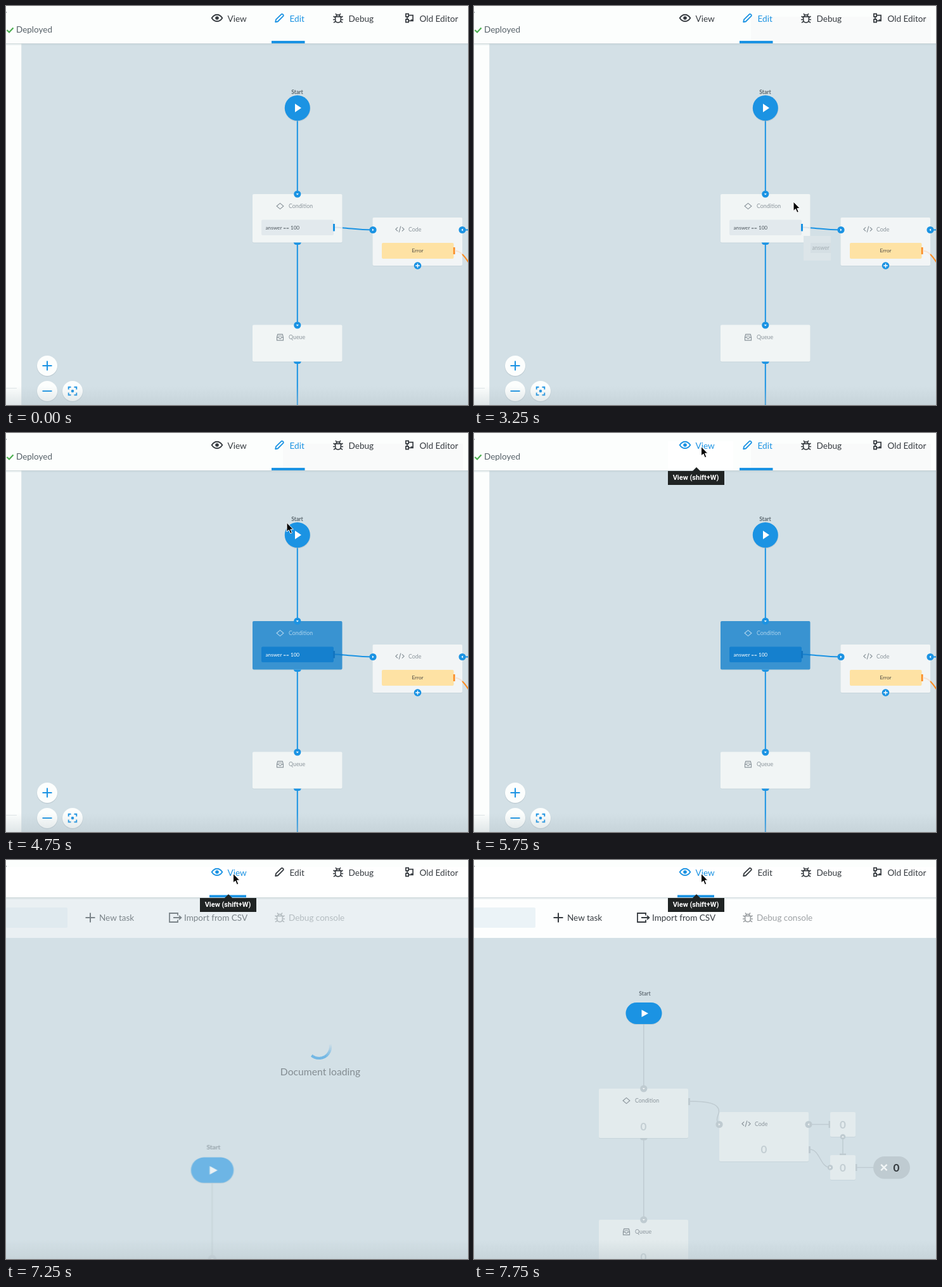
Animation, 729 px wide and 630 px high, one loop 8000 ms. Source, as an HTML page:

```html
<!DOCTYPE html>
<html lang="en">
<head>
<meta charset="utf-8">
<title>Process editor</title>
<style>
  html, body { margin: 0; width: 100%; height: 100%; overflow: hidden; }
  svg { display: block; width: 729px; height: 630px; }
  text { font-family: Lato, "Open Sans", sans-serif; }
</style>
</head>
<body>
<svg id="stage" viewBox="0 0 729 630" xmlns="http://www.w3.org/2000/svg"></svg>
<script>
const BLUE = '#1b93e3', INK = '#363b40', CANVAS = '#d3e0e6', PAPER = '#fcfefd', GREY = '#bfcbd1';
const LOOP = 8000, STEP = 250;

const rect = (x, y, w, h, fill, extra = '') =>
  `<rect x="${x}" y="${y}" width="${w}" height="${h}" fill="${fill}" ${extra}/>`;
const circle = (x, y, r, fill, extra = '') =>
  `<circle cx="${x}" cy="${y}" r="${r}" fill="${fill}" ${extra}/>`;
const line = (d, color = BLUE, width = 2, extra = '') =>
  `<path d="${d}" fill="none" stroke="${color}" stroke-width="${width}" ${extra}/>`;
const text = (x, y, str, size, fill = INK, extra = '') =>
  `<text x="${x}" y="${y}" font-size="${size}" fill="${fill}" ${extra}>${str}</text>`;
const group = (id, body, extra = '') => `<g id="${id}" ${extra}>${body}</g>`;
const at = (x, y, body) => `<g transform="translate(${x} ${y})">${body}</g>`;
const MID = 'text-anchor="middle"';
const BOLD = 'font-weight="700"';

// Icons, each centred on its own origin
const icon = {
  eye: c => line('M-8.3 0Q-5-5.2 0-5.2T8.3 0Q5 5.2 0 5.2T-8.3 0Z', c, 1.9) + circle(0, 0, 2.8, c),
  pencil: c => line('M-6.3 6.3L-5.5 2.4 3.2-6.2Q4.2-6.8 5.2-5.8L6-5Q6.8-4 6-3.1L-2.6 5.5Z', c, 1.8, 'stroke-linejoin="round"'),
  bug: c => line('M-4.3-2.6H4.3V2.5Q4 6.6 0 6.6T-4.3 2.5ZM-3-3Q-2.6-5.5 0-5.5T3-3M-2-5L-4-7.4M2-5L4-7.4M-4-1L-7.5-3.2M4-1L7.5-3.2M-4 2H-8M4 2H8M-4 4.6L-7 6.9M4 4.6L7 6.9', c, 1.6),
  blocks: c => line('M-5.6-6.6H-1.4V-2.2H-5.6ZM-5.6 2.2H-1.4V6.6H-5.6ZM-1.4-4.4H5.6V3H2.2M-3.5-2V2M-1.4 4.4H5.6V0', c, 1.7),
  diamond: c => line('M-5.4 0L0-4.6 5.4 0 0 4.6Z', c, 1.1),
  code: c => line('M-3.4-3.2L-6.6 0-3.4 3.2M3.4-3.2L6.6 0 3.4 3.2M1.4-4.8L-1.4 4.8', c, 1.2),
  tray: c => line('M-5 0L-3.8-4.6H3.8L5 0V4.8H-5ZM-5 .4H-2Q-1.5 2.4 0 2.4T2 .4H5M-3-2H3', c, 1.2),
  plus: c => line('M-7.5 0H7.5M0-7.5V7.5', c, 2),
  minus: c => line('M-7.5 0H7.5', c, 2),
  focus: c => line('M-6.3-2.5V-6.3H-2.5M2.5-6.3H6.3V-2.5M6.3 2.5V6.3H2.5M-2.5 6.3H-6.3V2.5', c, 1.9) + circle(0, 0, 2.3, c),
  exit: c => line('M4-3.5V-7H-9V7H4V3.5M-3 0H9M6-3.2L9.4 0 6 3.2', c, 1.8),
};

const port = (x, y, turn, color = BLUE, r = 5.6, mark = '#fff') =>
  circle(x, y, r, color) +
  `<path d="M-2-1.1H2L0 1.6Z" fill="${mark}" transform="translate(${x} ${y}) rotate(${turn})"/>`;
const stub = (x, y, color = BLUE) => `<path d="M${x - 6} ${y}H${x + 6}Q${x + 5} ${y + 3.6} ${x + 2} ${y + 3.6}H${x - 2}Q${x - 5} ${y + 3.6} ${x - 6} ${y}Z" fill="${color}"/>`;
const card = (x, y, w, h, fill) =>
  rect(x, y + 1, w, h, '#b9c8cf', 'rx="2" opacity=".45"') + rect(x, y, w, h, fill, 'rx="2"');
const title = (x, y, name, label, c = '#8b959c') =>
  at(x, y, icon[name](c)) + text(x + 13.5, y + 3, label, 8.8, c);
const zoomButton = (x, y, name) =>
  circle(x, y + 1, 16.4, '#aebcc3', 'opacity=".5"') + circle(x, y, 16, PAPER) + at(x, y, icon[name](BLUE));

function conditionCard(selected) {
  const [fill, field, ink, label] = selected
    ? ['#3993d1', '#1580ce', '#fff', '#add4ee'] : ['#f1f5f5', '#e2e9ed', '#4d565d', '#8b959c'];
  return card(389, 297, 141.5, 76.5, fill) +
    title(432.5, 316, 'diamond', 'Condition', label) +
    rect(403, 337.5, 114, 24.5, field, 'rx="2"') +
    text(409.5, 352.6, 'answer == 100', 8.2, ink) +
    rect(516, 344, 3, 11.5, selected ? '#1275c0' : BLUE) +
    line('M519 349.5Q525 349.6 531 350.4', selected ? '#1580ce' : '#dbe3e8', 2);
}

const editor =
  rect(0, 59, 25, 571, PAPER) + rect(24, 59, 1, 571, '#dde6e9') + rect(0, 603, 17, 1, '#dfe6e7') +
  line('M459.8 181V297M459.8 376V504M459.8 565V630M530 350.2C548 351.5 556 353.5 579 353.5M720 353.5H729') +
  text(459.5, 139, 'Start', 8.6, '#59656d', `${MID} ${BOLD}`) +
  circle(460, 162, 20.3, '#9fb4c0', 'opacity=".5"') + circle(459.8, 161, 20, BLUE) +
  '<path d="M456 154.2L466 161 456 167.8Z" fill="#fff"/>' +
  group('plain', conditionCard(false)) + group('selected', conditionCard(true)) +
  stub(459.8, 373.5) + port(459.8, 297, 0) +
  card(578.5, 334, 141.5, 76, '#f2f5f6') + title(621.5, 352.5, 'code', 'Code') +
  rect(593, 374, 113.5, 25, '#fee2a4', 'rx="2"') + text(649.5, 389, 'Error', 8.2, '#4d4a42', MID) +
  rect(705.8, 381, 2.7, 11, '#fb8c23') +
  line('M708.5 386.5Q715 387 720 392', '#f5e3d4', 2) + line('M720 392Q725 397 730 405', '#fb8c23', 2) +
  port(579, 353.5, -90) + port(720, 353.5, 90) +
  circle(649.5, 410, 5.8, BLUE) + line('M646.2 410H652.8M649.5 406.7V413.3', '#fff', 1.4) +
  card(389, 503.5, 141.5, 58, '#f1f5f5') + title(432.5, 523, 'tray', 'Queue') +
  stub(459.8, 561.5) + port(459.8, 504, 0) +
  group('ghost', rect(520, 363, 43, 39, '#dce5e9') + rect(531, 374, 32, 16, '#d5dfe4') +
    text(533.5, 385, 'answer', 8.6, '#a3adb3')) +
  zoomButton(65, 568, 'plus') + zoomButton(65, 608, 'minus') + zoomButton(105, 608, 'focus');

const zero = (x, y, size = 17, c = '#c3ced3') => text(x, y, '0', size, c, `${MID} ${BOLD}`);
const greyPort = (x, y, turn, r) => port(x, y, turn, GREY, r, '#eef3f5');
const NODE = '#e3ebed';

const graph =
  line('M267.8 259V361M267.8 440V568M340 381C365 381 390 383 386 400C383 408 382 413 387 417.5M528 417.5H562M530 457C546 457 546 485.5 562 485.5M582 437V466M602 485.5H630', GREY, 1.5) +
  text(269.5, 214, 'Start', 8.6, '#66727a', `${MID} ${BOLD}`) +
  rect(239.5, 226, 57, 34, '#a9bcc7', 'rx="17" opacity=".6"') + rect(239.5, 225, 57, 34, BLUE, 'rx="17"') +
  '<path d="M264.5 236.5L275 242.2 264.5 248Z" fill="#fff"/>' +
  stub(267.8, 439, GREY) + rect(338, 376, 3, 11, GREY) + rect(528, 452, 3, 11, GREY) +
  rect(559.5, 412, 3, 11, GREY) + rect(577, 463.5, 10, 3, GREY) + rect(601.5, 480, 3, 11, GREY) +
  card(197, 361, 141, 78, NODE) + title(240.5, 380, 'diamond', 'Condition') + zero(267.5, 426.5) +
  card(387, 398, 141, 78, NODE) + title(429.5, 416.5, 'code', 'Code') + zero(457.5, 463) +
  card(562, 398, 40, 39, NODE) + zero(582, 424) +
  card(562, 466, 40, 39, NODE) + zero(582, 492) +
  card(197, 568, 141, 78, NODE) + title(240.5, 587, 'tray', 'Queue') + zero(267.5, 633) +
  rect(630, 468, 58, 35.5, GREY, 'rx="17.7"') + line('M642.2 480.8L651.6 490.2M651.6 480.8L642.2 490.2', '#f2f6f7', 2.4) +
  zero(666.5, 492, 17, '#343a3e') +
  greyPort(267.8, 361, 0) + greyPort(267.8, 568, 0) + greyPort(387, 417.5, -90) + greyPort(528, 417.5, 90) +
  greyPort(582, 437, 180, 4.3) + greyPort(562, 485.5, -90, 4.3);

const toolbar = rect(0, 59, 729, 64, '#fdfefe') + rect(0, 75, 97, 32, '#ebf3f7', 'rx="2"') +
  at(133, 91, icon.plus(INK)) + text(147, 95.5, 'New task', 13.5) +
  at(267, 91, icon.exit(INK)) + text(281, 95.5, 'Import from CSV', 13.5) +
  at(432, 91, icon.bug('#9da1a4')) + text(446, 95.5, 'Debug console', 13.5, '#9da1a4');

function spinnerArc() {
  const n = 28, sweep = 142, r = 18;
  const point = deg => `${(r * Math.cos(deg * Math.PI / 180)).toFixed(2)} ${(r * Math.sin(deg * Math.PI / 180)).toFixed(2)}`;
  return Array.from({ length: n }, (_, i) => {
    const a = -sweep + i * sweep / n;
    return line(`M${point(a)}A${r} ${r} 0 0 1 ${point(a + sweep / n + .4)}`, BLUE, 4.2, `opacity="${Math.min(1, (i + 1) / 14)}"`);
  }).join('');
}

const tab = (x, y, name, label, labelX, id = '') =>
  `<g ${id && `id="${id}"`} color="${INK}">` + at(x, y, icon[name]('currentColor')) +
  text(labelX, 25, label, 13.6, 'currentColor') + '</g>';

const header = rect(0, 59, 729, 1, '#c2ced1', 'opacity=".75"') + rect(0, 60, 729, 2, '#b9c8ca', 'opacity=".25"') +
  rect(0, 0, 729, 59, PAPER) +
  group('patch', rect(437, 17, 284, 42, '#f9fafa')) +
  group('hoverPatch', rect(306, 13, 103, 46, '#fff')) +
  group('whiteBar', rect(0, 11, 729, 48, '#fff')) +
  rect(0, 9, 1, 2, '#9aa3a6') +
  group('deployed', line('M1.5 38L5 41.5 11.5 34.5', '#4caf50', 2.2) + text(16, 42, 'Deployed', 13.5, '#566168')) +
  tab(333, 19, 'eye', 'View', 349.5, 'viewTab') + tab(431.5, 19, 'pencil', 'Edit', 447.5, 'editTab') +
  tab(524, 19.5, 'bug', 'Debug', 540.5) + tab(636.5, 19, 'blocks', 'Old Editor', 652.5) +
  `<rect id="underline" fill="${BLUE}"/>`;

const tooltip = rect(306, 60, 89, 22, '#202424') + '<path d="M345 60L351 54 357 60Z" fill="#202424"/>' +
  text(350, 74.3, 'View (shift+W)', 11, '#fff', `${MID} ${BOLD} style="font-family:Roboto,sans-serif"`);

const pointer = '<path d="M0 0V14.5L3.4 11.5 5.8 17.2 8.3 16.2 5.9 10.6H10.3Z" fill="#050505" stroke="#fff" stroke-width="1" stroke-linejoin="round"/>';

document.getElementById('stage').innerHTML =
  '<defs><linearGradient id="floor" x2="0" y2="1"><stop stop-color="#b5c2c8" stop-opacity="0"/><stop offset="1" stop-color="#b5c2c8" stop-opacity=".4"/></linearGradient></defs>' +
  rect(0, 0, 729, 630, CANVAS) + group('editor', editor) +
  group('graph', graph) +
  group('loading', at(494, 295, group('spinner', spinnerArc())) + text(496, 340, 'Document loading', 15.7, '#42484d', MID)) +
  rect(0, 600, 729, 30, 'url(#floor)') +
  group('toolbar', toolbar) + header + group('tooltip', tooltip) + group('cursor', pointer);

const $ = id => document.getElementById(id);
const show = (id, on) => $(id).setAttribute('display', on ? 'inline' : 'none');
const set = (id, attrs) => Object.entries(attrs).forEach(([k, v]) => $(id).setAttribute(k, v));

// time, x, y of the pointer tip
const cursorPath = [
  [1250, 644.5, 236.5], [1500, 535.5, 264.5], [1750, 506.5, 302.5], [2000, 504, 309],
  [4500, 497, 279.5], [4750, 443, 141.5], [5000, 397, 60.5], [5500, 358.5, 21.5],
];

function render(t) {
  const viewing = t >= 6500, faded = t >= 7250, hover = t >= 5500;
  show('editor', !viewing);
  show('deployed', !viewing);
  show('whiteBar', viewing);
  show('plain', t < 3500);
  show('selected', t >= 3500);
  show('ghost', t >= 3250 && t < 3750);
  show('patch', t >= 3250);
  show('hoverPatch', hover);
  show('tooltip', t >= 5750);
  set('viewTab', { color: hover ? BLUE : INK });
  set('editTab', { color: viewing ? INK : BLUE });
  set('underline', viewing
    ? { x: 321, y: 55.3, width: 58, height: t < 6750 ? 2.7 : 3.7 }
    : { x: 419, y: 55, width: 52.5, height: 4 });

  const spot = cursorPath.filter(p => p[0] <= t).pop();
  show('cursor', spot);
  if (spot) set('cursor', { transform: `translate(${spot[1]} ${spot[2]})` });

  show('loading', viewing && t < 7500);
  set('loading', { opacity: faded ? .55 : 1 });
  set('spinner', { transform: `rotate(${-65 + (t - 6500) / STEP * 65})` });

  // The view settles from slightly zoomed in to its resting place
  const k = t < 7500 ? 1 : t < 7750 ? .06 : 0;
  show('graph', faded);
  show('toolbar', faded);
  set('graph', {
    opacity: t < 7500 ? .55 : 1,
    transform: `translate(${268 + 57.5 * k} ${242 + 247.5 * k}) scale(${1 + .18 * k}) translate(-268 -242)`,
  });
  set('toolbar', { opacity: t < 7500 ? .55 : 1 });
}

function tick() {
  render(Math.floor(performance.now() % LOOP / STEP) * STEP);
  requestAnimationFrame(tick);
}
tick();
</script>
</body>
</html>
```
